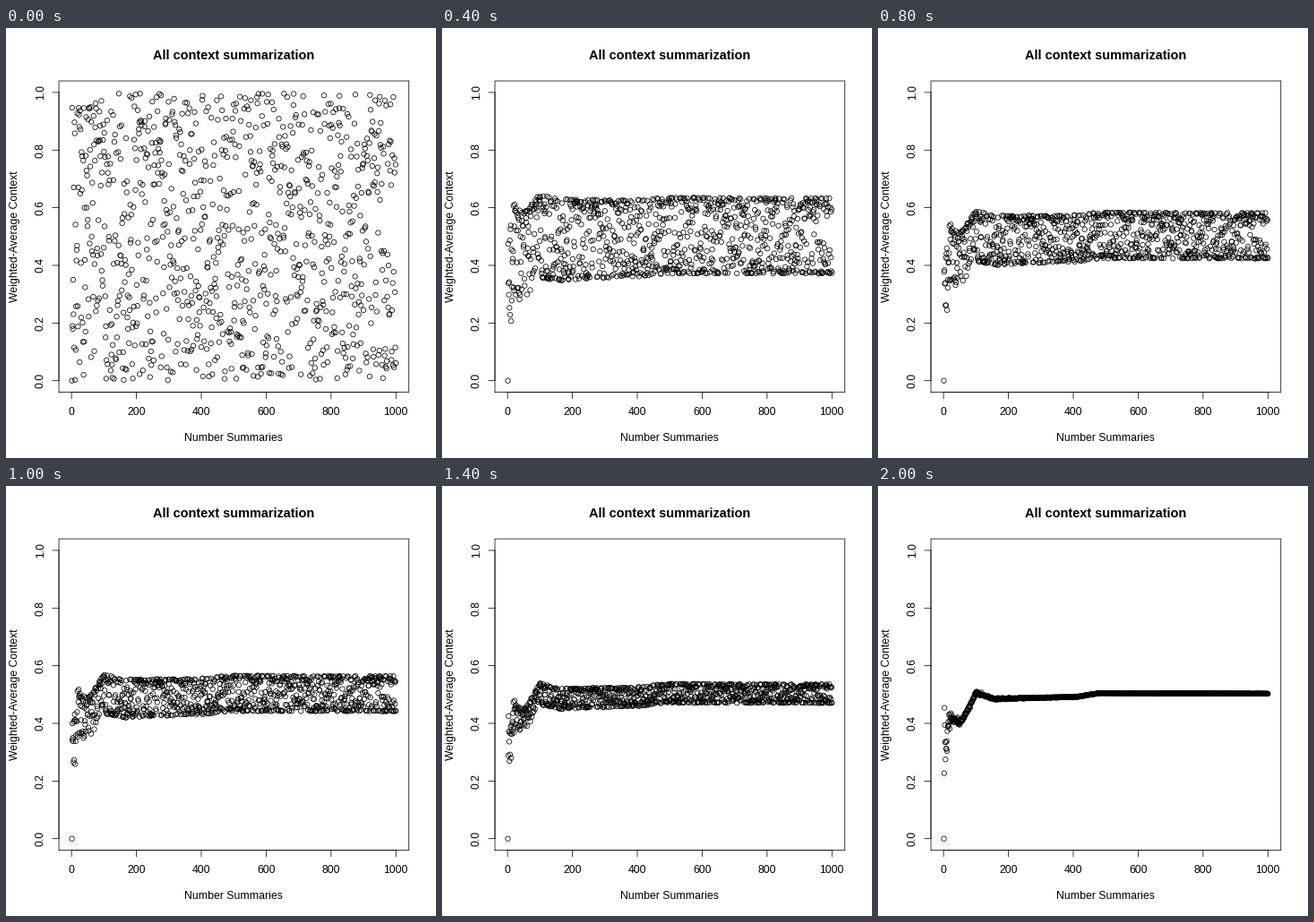
Animation of 480 by 480 pixels, one loop 2100 ms. Source, as a matplotlib script:

```python
import numpy as np
import matplotlib.pyplot as plt
from matplotlib.animation import FuncAnimation

SIZE, DPI = 480, 72
STEPS, COUNT = 21, 1000
LEFT, RIGHT, TOP, BOTTOM = 59.04, 449.76, 59.04, 406.56
PAD = 0.04 / 1.08
LINE = 0.75
TEXT = 12.25


def to_x(v):
    w = RIGHT - LEFT
    return LEFT + w * (PAD + (v - 1) / (COUNT - 1) * (1 - 2 * PAD))


def to_y(v):
    h = BOTTOM - TOP
    return BOTTOM - h * (PAD + v * (1 - 2 * PAD))


fig = plt.figure(figsize=(SIZE / DPI, SIZE / DPI), dpi=DPI, facecolor="white")
ax = fig.add_axes([0, 0, 1, 1])
ax.set_xlim(0, SIZE)
ax.set_ylim(SIZE, 0)
ax.axis("off")


def stroke(xs, ys):
    ax.plot(xs, ys, color="black", lw=LINE, snap=False,
            solid_capstyle="round", solid_joinstyle="round")


def label(x, y, s, size=TEXT, **kw):
    ax.text(x, y, s, fontsize=size, family="Liberation Sans", ha="center",
            va="baseline", rotation_mode="anchor", **kw)


# Box, axes and titles
stroke([LEFT, RIGHT, RIGHT, LEFT, LEFT], [BOTTOM, BOTTOM, TOP, TOP, BOTTOM])
stroke([to_x(0), to_x(1000)], [BOTTOM, BOTTOM])
stroke([LEFT, LEFT], [to_y(0), to_y(1)])
for v in range(0, 1001, 200):
    stroke([to_x(v)] * 2, [BOTTOM, BOTTOM + 7.2])
    label(to_x(v), 432.5, str(v))
for v in np.linspace(0, 1, 6):
    stroke([LEFT, LEFT - 7.2], [to_y(v)] * 2)
    label(41.8, to_y(v), f"{v:.1f}", rotation=90)
mid_x, mid_y = (LEFT + RIGHT) / 2, (TOP + BOTTOM) / 2
label(mid_x, 35, "All context summarization", 14.55, weight="bold")
label(mid_x, 461.3, "Number Summaries")
label(13, mid_y, "Weighted-Average Context", rotation=90)

# Uniform raw values, higher where the average climbs
rng = np.random.default_rng(12)
n = np.arange(1, COUNT + 1)
raw = rng.uniform(0, 1, COUNT)
raw[0] = 0
raw[75:97] **= 0.5

# Running average: a few turning points plus noise that fades with n
mean = np.interp(n, [1, 3, 6, 16, 50, 75, 100, 155, 410, 480, COUNT],
                 [0, .454, .275, .42, .40, .445, .506, .485, .492, .505, .503])
mean[6:] += rng.normal(0, 0.25, COUNT - 6) / n[6:]

# Spread around the average, crowded towards both edges of the band
room = np.where(raw > mean, 1 - mean, mean)
offset = np.divide(raw - mean, room, out=np.zeros(COUNT), where=room > 0)
early = 1 + 0.24 * np.exp(-n / 150)
spread = room * early * np.sin(np.pi / 2 * offset)

px = to_x(n)
dots = ax.scatter(px, to_y(raw), s=5.4 ** 2, facecolors="none",
                  edgecolors="black", linewidths=[LINE, LINE], zorder=3)


def update(k):
    weight = 1 - (k / (STEPS - 1)) ** 0.188
    vals = mean + weight * spread if k else raw
    dots.set_offsets(np.column_stack([px, to_y(vals)]))
    return (dots,)


anim = FuncAnimation(fig, update, frames=STEPS, interval=100, repeat=True,
                     repeat_delay=0, blit=False)
plt.show()
```
